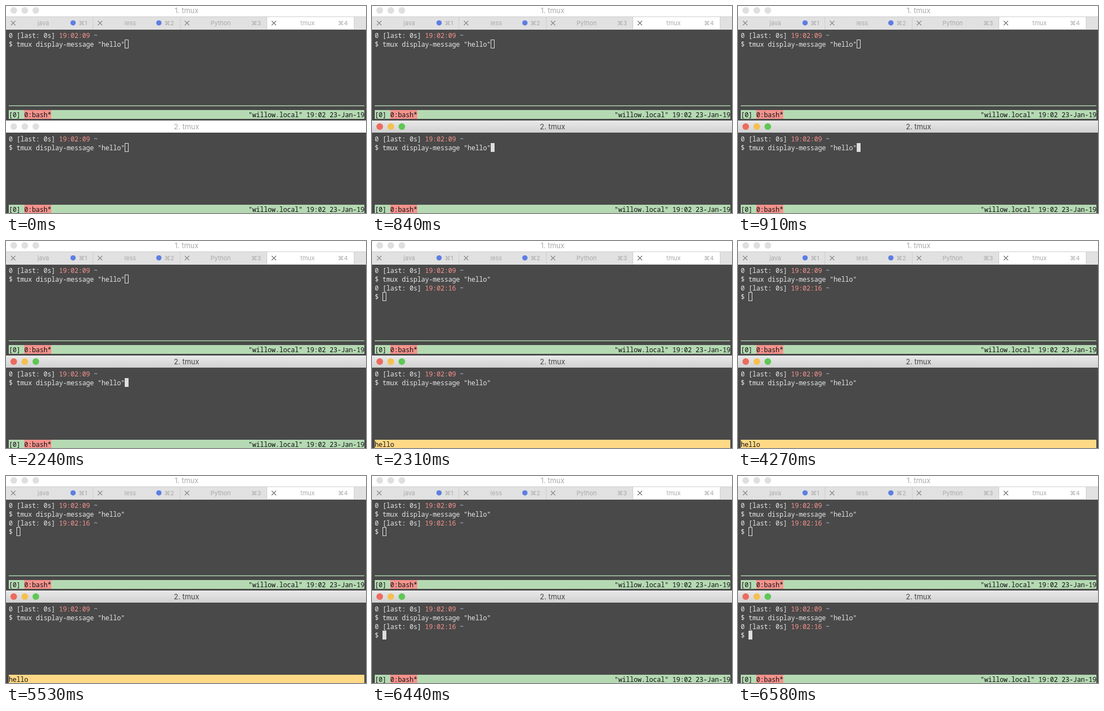
Animation, 652 px wide and 376 px high, one loop 6650 ms. Source, as an HTML page with a canvas:

```html
<!DOCTYPE html>
<html lang="en">
<head>
<meta charset="utf-8">
<title>tmux display-message</title>
<style>
html, body { margin: 0; width: 652px; height: 376px; overflow: hidden; background: #494949; }
canvas { display: block; }
</style>
</head>
<body>
<canvas id="stage" width="652" height="376"></canvas>
<script>
const ctx = document.getElementById('stage').getContext('2d');
const LOOP = 6650, FOCUS = 840, ENTER = 2310, EXPIRE = 6440;
const W = 652, LEFT = 5, CELL = 7, ROW = 16, COLS = 92;
const MONO = '12px "Noto Sans Mono", "DejaVu Sans Mono", monospace';
const UI = 'Inter, "DejaVu Sans", sans-serif';
const BG = '#494949', FG = '#e6e6e6', RED = '#f5938d', BLUE = '#bcc7ee';
const GREEN = '#b5dab3', YELLOW = '#ffd986', WHITE = '#fff';
const TAB = '#e1e1e1', EDGE = '#cecece', DIM = '#a9a9a9';

function box(x, y, w, h, color) {
  ctx.fillStyle = color;
  ctx.fillRect(x, y, w, h);
}

function dot(x, y, r, color) {
  ctx.fillStyle = color;
  ctx.beginPath();
  ctx.arc(x, y, r, 0, Math.PI * 2);
  ctx.fill();
}

function label(str, x, y, size, color, align = 'center') {
  ctx.font = size + 'px ' + UI;
  ctx.textAlign = align;
  ctx.fillStyle = color;
  ctx.fillText(str, x, y);
}

// Terminal text sits on a fixed grid of cells.
function type(str, col, top, color) {
  ctx.font = MONO;
  ctx.textAlign = 'center';
  ctx.fillStyle = color;
  [...str].forEach((ch, i) => ctx.fillText(ch, LEFT + (col + i + 0.5) * CELL, top + 13));
}

function cursor(col, top, filled) {
  const x = LEFT + col * CELL;
  if (filled) {
    box(x, top, CELL, ROW, '#dedede');
  } else {
    ctx.strokeStyle = FG;
    ctx.lineWidth = 1;
    ctx.strokeRect(x + 0.5, top + 0.5, CELL - 1, ROW - 1);
  }
}

function prompt(time, top) {
  type('0 [last: 0s]', 0, top, FG);
  type(time, 13, top, RED);
  type('~', 22, top, BLUE);
  type('$', 0, top + ROW, FG);
}

function session(top, done) {
  prompt('19:02:09', top);
  type('tmux display-message "hello"', 2, top + ROW, FG);
  if (done) prompt('19:02:16', top + 2 * ROW);
}

function status(top) {
  box(LEFT, top, COLS * CELL, ROW, GREEN);
  box(LEFT + 4 * CELL, top, 7 * CELL, ROW, RED);
  type('[0] 0:bash*', 0, top, '#111');
  type('"willow.local" 19:02 23-Jan-19', 62, top, '#111');
}

function message(top) {
  box(LEFT, top, COLS * CELL, ROW, YELLOW);
  type('hello', 0, top, '#111');
}

function titleBar(name, y, h, mid, active) {
  let fill = WHITE;
  if (active) {
    fill = ctx.createLinearGradient(0, y, 0, y + h);
    fill.addColorStop(0, '#e9e9e9');
    fill.addColorStop(1, '#d1d1d1');
  }
  box(0, y, W, h, fill);
  const lights = active ? ['#ed6a5f', '#f5c04f', '#5fc754'] : Array(3).fill('#dfdfdf');
  lights.forEach((c, i) => dot(14 + i * 20, mid, 6, c));
  label(name, 327, mid + 5, 13, active ? '#444' : DIM);
}

function tabs() {
  box(0, 19, W, 24, TAB);
  box(0, 19, W, 1, EDGE);
  ['java', 'less', 'Python', 'tmux'].forEach((name, i) => {
    const x = i * 157.4, on = i === 3;
    if (on) box(473, 20, 157, 22, WHITE);
    box(Math.round(x + 157.4), 19, 1, 24, EDGE);
    ctx.strokeStyle = on ? '#6c6c6c' : '#858585';
    ctx.lineWidth = 1.1;
    ctx.beginPath();
    ctx.moveTo(x + 9, 27);
    ctx.lineTo(x + 17, 35);
    ctx.moveTo(x + 17, 27);
    ctx.lineTo(x + 9, 35);
    ctx.stroke();
    label(name, x + (i < 2 ? 67.5 : 74), 35, 11, DIM);
    if (i < 2) dot(x + 121.5 - i * 2, 30.7, 4.8, '#5d7ee2');
    label('\u2318' + (i + 1), x + 147, 35, 11, DIM, 'right');
  });
}

function draw(t) {
  const active = t >= FOCUS;
  const sent = t >= ENTER;
  const expired = t >= EXPIRE;
  box(0, 0, W, 376, BG);

  titleBar('1. tmux', 0, 19, 8, false);
  tabs();
  session(45, sent);
  if (sent) cursor(2, 93, false);
  else cursor(30, 61, false);
  box(LEFT, 180.6, COLS * CELL, 1.4, GREEN);
  status(189);

  titleBar('2. tmux', 208, 22, 219, active);
  session(233, expired);
  if (expired) cursor(2, 281, true);
  else if (!sent) cursor(30, 249, active);
  if (sent && !expired) message(361);
  else status(361);
}

const start = performance.now();
function tick() {
  draw((performance.now() - start) % LOOP);
  requestAnimationFrame(tick);
}
tick();
</script>
</body>
</html>
```
